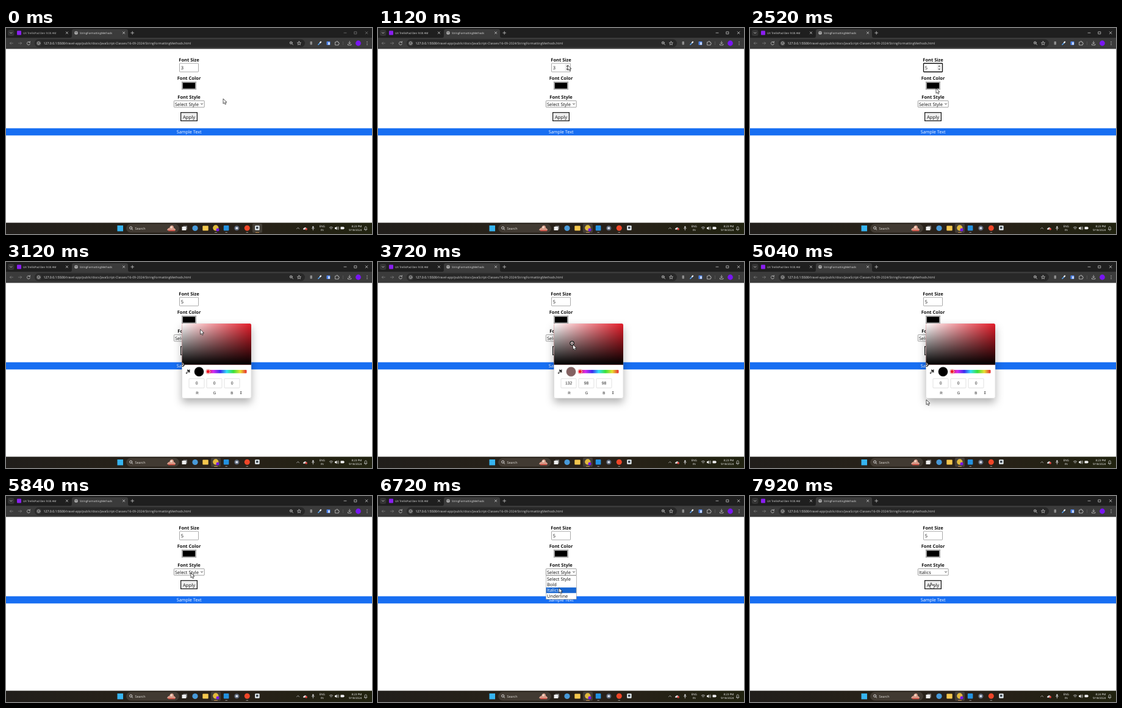
Write an HTML page that moves like this. It is 600 px wide and 338 px high and loops after 8000 ms.

```html
<!DOCTYPE html>
<html lang="en">
<head>
<meta charset="utf-8">
<title>Font form</title>
<style>
html, body { margin: 0; width: 100%; height: 100%; overflow: hidden; background: #fff; }
svg { display: block; width: 100%; height: 100%; }
text { font-family: "Open Sans", "Noto Sans", sans-serif; text-rendering: geometricPrecision; white-space: pre; }
.form { font-size: 7.45px; fill: #111; }
.bold { font-weight: 700; font-size: 7.5px; }
.mid { text-anchor: middle; }
.tab { font-size: 4.45px; fill: #e3e3e3; }
.tray { font-size: 4.5px; fill: #fff; }
.line { fill: none; stroke: #c8c8c8; stroke-width: .8; stroke-linecap: round; stroke-linejoin: round; }
.rgb text { font: 6.8px "Liberation Sans", Arial, sans-serif; fill: #222; text-anchor: middle; }
.rgb .unit { font-size: 6.2px; }
</style>
</head>
<body>
<svg viewBox="0 0 600 338" preserveAspectRatio="none">
  <defs>
    <linearGradient id="bar">
      <stop offset="0" stop-color="#211e1b"/><stop offset=".3" stop-color="#262119"/>
      <stop offset=".6" stop-color="#29211a"/><stop offset="1" stop-color="#20220f"/>
    </linearGradient>
    <linearGradient id="white"><stop stop-color="#fff"/><stop offset="1" stop-color="#fff" stop-opacity="0"/></linearGradient>
    <linearGradient id="black" x2="0" y2="1"><stop stop-color="#000" stop-opacity="0"/><stop offset="1"/></linearGradient>
    <linearGradient id="hue">
      <stop stop-color="#f02030"/><stop offset=".17" stop-color="#d02af0"/><stop offset=".34" stop-color="#3a2cf0"/>
      <stop offset=".5" stop-color="#30dff5"/><stop offset=".67" stop-color="#38e038"/>
      <stop offset=".84" stop-color="#e8e030"/><stop offset="1" stop-color="#e82830"/>
    </linearGradient>
    <filter id="shade" x="-30%" y="-30%" width="160%" height="170%">
      <feDropShadow dx="0" dy="7" stdDeviation="7" flood-opacity=".3"/>
    </filter>
    <clipPath id="panel"><rect x="288.5" y="101" width="113.5" height="122.5" rx="2.5"/></clipPath>
  </defs>
  <rect width="600" height="338" fill="#fff"/>

  <!-- browser frame -->
  <rect width="600" height="17" fill="#1f1f1f"/>
  <rect y="16" width="600" height="18.3" fill="#3b3b3b"/>
  <path d="M105 16q3 0 3-3V5q0-3 3-3h86q3 0 3 3v8q0 3 3 3z" fill="#3b3b3b"/>
  <rect x="3" y="3" width="10.5" height="10" rx="3" fill="#343434"/>
  <path class="line" d="M6.5 7.2l1.8 1.8 1.8-1.8"/>
  <rect x="18" y="4.5" width="7" height="7" rx="1" fill="#8a1ff0"/>
  <text class="tab" id="tab" x="28" y="9.7">UX TrellisPad Den 9:00 AM</text>
  <circle cx="115" cy="8" r="2.8" fill="#bbb"/><path d="M112.5 7.5h5M115 5.2v5.6" stroke="#555" stroke-width=".6"/>
  <text class="tab" x="121" y="9.7">StringFormattingMethods</text>
  <path class="line" d="M98.2 6.2l3.4 3.4m0-3.4l-3.4 3.4M191.4 6.2l3.4 3.4m0-3.4l-3.4 3.4M207.2 5.6v4.8M204.8 8h4.8"/>
  <path class="line" id="controls" d="M554 8h4M571.2 6.2h3.6v3.6h-3.6zM589.2 6l3.8 3.8m0-3.8l-3.8 3.8"/>
  <path class="line" stroke-opacity=".45" d="M11.5 25h-5m2-2l-2 2 2 2M20.5 25h5m-2-2l2 2-2 2"/>
  <path class="line" d="M39 23.5a2.6 2.6 0 1 0 .5 2.4M39.4 22v1.8h-1.8"/>
  <rect x="47" y="18.5" width="443" height="13" rx="6.5" fill="#282828"/>
  <circle cx="53.5" cy="25" r="4.5" fill="#3d3d3d"/><circle class="line" cx="53.5" cy="25" r="2.3"/><path class="line" d="M53.5 25v1"/>
  <text x="61.5" y="26.9" font-size="5.2" fill="#d5d5d5"><tspan fill="#fff">127.0.0.1:5500</tspan>/travel-app/public/docs/JavaScript-Classes/16-09-2024/StringFormattingMethods.html</text>
  <circle class="line" cx="467.3" cy="24.3" r="2"/><path class="line" d="M469 26l1.6 1.6M466.5 24.3h1.6"/>
  <path class="line" d="M480.5 22l.9 2 2.1.2-1.6 1.4.5 2.1-1.9-1.1-1.9 1.1.5-2.1-1.6-1.4 2.1-.2z"/>
  <rect x="498.5" y="22" width="3.5" height="5.5" rx="1" fill="#8e8e8e"/>
  <path d="M511.5 27.8l3.8-3.8" stroke="#58a6f5" stroke-width="1.6"/><path d="M514.5 24.5l2.2-2.2" stroke="#fff" stroke-width="2"/>
  <rect x="525.5" y="22" width="6" height="6" rx="1" fill="#4f83e8"/><rect x="528.5" y="23.5" width="2" height="4" fill="#fff"/>
  <path class="line" d="M540 23h1.7q0-1.5 1-1.5t1 1.5h1.5v1.6q1.3 0 1.3.9t-1.3.9v1.6H540z"/>
  <path d="M552.5 22v6" stroke="#666" stroke-width=".6"/>
  <path class="line" d="M563.2 21.8v4m-1.7-1.6l1.7 1.7 1.7-1.7M560.5 26.5v1.5h5.4v-1.5"/>
  <circle cx="577.5" cy="25" r="4.4" fill="#7816f2"/>
  <path d="M592 22.6v.1M592 25v.1M592 27.4v.1" stroke="#ddd" stroke-width="1.1" stroke-linecap="round"/>

  <!-- form -->
  <g class="form">
    <text class="bold mid" x="300" y="55">Font Size</text>
    <rect id="field" x="284.5" y="58" width="31" height="14" rx=".8" fill="#fff"/>
    <text id="size" x="286.7" y="68.2"></text>
    <g id="spin"><rect x="306.5" y="59.5" width="7.5" height="11" fill="#eee"/>
      <path d="M308.4 63.4h3.6l-1.8-2.2zM308.4 66.8h3.6l-1.8 2.2z" fill="#555"/></g>
    <text class="bold mid" x="300" y="85.2">Font Color</text>
    <rect x="288.3" y="88.3" width="23.4" height="12.4" fill="#efefef" stroke="#808080" stroke-width=".7"/>
    <rect id="swatch" x="289.8" y="89.7" width="20.4" height="9.8" stroke="#777" stroke-width=".4"/>
    <text class="bold mid" x="300" y="116">Font Style</text>
    <rect x="275.4" y="119.3" width="49.8" height="10.8" rx="1" fill="#fff" stroke="#767676" stroke-width=".7"/>
    <text id="style" x="277" y="127.6"></text>
    <path d="M319.3 123.6l1.7 1.8 1.7-1.8" fill="none" stroke="#222" stroke-width=".9"/>
    <rect x="286.6" y="138.7" width="26.8" height="13.6" fill="#efefef" stroke="#111" stroke-width="1.2"/>
    <text class="mid" x="300" y="148.6" font-size="7.65">Apply</text>
  </g>
  <rect y="164.5" width="600" height="11.8" fill="#176ef2"/>
  <text class="mid" x="300.2" y="173.2" font-size="7.25" fill="#fff">Sample Text</text>

  <g id="menu" class="form"></g>

  <!-- colour picker -->
  <g id="picker">
    <rect x="288.5" y="101" width="113.5" height="122.5" rx="2.5" fill="#fff" stroke="#bbb" stroke-width=".4" filter="url(#shade)"/>
    <g clip-path="url(#panel)">
      <rect x="288" y="101" width="114" height="67.5" fill="#e21c29"/>
      <rect x="288" y="101" width="114" height="67.5" fill="url(#white)"/>
      <rect x="288" y="101" width="114" height="67.5" fill="url(#black)"/>
      <g id="ring" fill="none"><circle r="3" stroke="#111" stroke-width="1.6"/><circle r="2.1" stroke="#fff" stroke-width=".9"/></g>
    </g>
    <path d="M295.3 183l.5-1.7 3-3 1.2 1.2-3 3z" fill="none" stroke="#111" stroke-width=".9"/>
    <path d="M297.8 177.4l3 3M299.3 179l1.6-1.6" stroke="#111" stroke-width="1.7" stroke-linecap="round"/>
    <circle id="dot" cx="316.5" cy="180" r="7.8" stroke="#999" stroke-width=".3"/>
    <rect x="329" y="177" width="65.5" height="5.6" rx="1" fill="url(#hue)"/>
    <circle cx="331.3" cy="179.8" r="3.2" fill="#ee1c2a" stroke="#fff" stroke-width="1"/>
    <circle cx="331.3" cy="179.8" r="3.8" fill="none" stroke="#c33" stroke-width=".4"/>
    <g class="rgb" id="rgb"></g>
    <path d="M383.6 213.7l1.5-1.7 1.5 1.7zM383.6 215.3l1.5 1.7 1.5-1.7z" fill="#222"/>
  </g>

  <!-- taskbar -->
  <rect y="319.5" width="600" height="18.5" fill="url(#bar)"/>
  <rect id="active" y="321" width="16" height="15" rx="2" fill="#fff" fill-opacity=".13"/>
  <rect x="182.5" y="324" width="9.5" height="9.5" fill="#36b4f0"/>
  <rect x="197.5" y="322" width="86" height="13.2" rx="6.6" fill="#413a32" stroke="#574f45" stroke-width=".4"/>
  <circle cx="204.7" cy="328" r="2" fill="none" stroke="#fff" stroke-width=".8"/><path d="M206.2 329.6l1.8 1.8" stroke="#fff" stroke-width=".8"/>
  <text x="211.5" y="330.7" font-size="5.4" fill="#e2ded8">Search</text>
  <path d="M264 332q1-4 4-4 1-4 4-4t3 4q3 1 3 4z" fill="#d89a88"/><path d="M266 332.5h11" stroke="#d84a3f" stroke-width="1.5"/>
  <circle cx="271" cy="327" r="1.7" fill="#f0dcca"/>
  <rect x="290.5" y="324.5" width="6.5" height="6" fill="#777"/><rect x="288.5" y="326" width="6.8" height="6" fill="#eee"/>
  <circle cx="310" cy="328.5" r="4.6" fill="#4899d8"/>
  <rect x="322.3" y="324.5" width="9.4" height="8" rx="1" fill="#f5c74e"/>
  <circle cx="343.8" cy="328" r="4.7" fill="#e0b83d"/><circle cx="347" cy="331" r="2.5" fill="#7816f2"/>
  <rect x="356.8" y="324" width="8.6" height="8.6" rx="1" fill="#2391e0"/>
  <circle cx="378.3" cy="328.4" r="4.2" fill="#566072"/><rect x="376.4" y="326.6" width="3.8" height="3.6" fill="#d8dde8"/>
  <circle cx="395.3" cy="328.3" r="4.5" fill="#ef4628"/>
  <rect x="408.2" y="324.3" width="7.4" height="7.4" rx="1" fill="#e8f0f5"/><rect x="410" y="326" width="3.5" height="3.5" fill="#39434d"/>
  <path d="M342 335.4h4M359.5 335.4h3.4M393.6 335.4h3.4" stroke="#aaa" stroke-width=".8"/>
  <path id="under" stroke="#c58c4d" stroke-width="1"/>
  <path class="line" d="M476.7 329.5l2-2 2 2"/>
  <path d="M487.2 330.8q-.5-2.7 1.8-2.8 1-2 2.7-.2 2 0 1.6 3z" fill="#ddd"/><circle cx="492.2" cy="330" r="1.7" fill="#e23b36"/>
  <rect x="502.3" y="325" width="2.2" height="4.2" rx="1.1" fill="#ccc"/><path class="line" d="M501.4 328.5q2 3.4 4 0M503.4 330.3v1.5"/>
  <g class="tray">
    <text class="mid" x="518.3" y="327.3">ENG</text><text class="mid" x="518.3" y="333.3">IN</text>
    <text id="clock" x="583.3" y="327.2" text-anchor="end"></text><text x="583.3" y="333.3" text-anchor="end">9/18/2024</text>
  </g>
  <path class="line" d="M530.2 327.3q2.8-2.4 5.6 0M531.4 328.8q1.6-1.3 3.2 0M533 330.3v.1" stroke="#fff"/>
  <path d="M539 327.3h1.5l1.8-1.6v5.6l-1.8-1.6H539z" fill="#fff"/><path class="line" d="M543.5 327q1 1.5 0 3M544.8 326q1.8 2.5 0 5"/>
  <rect x="548.5" y="326.3" width="5.5" height="4" rx=".8" fill="#eee"/><path d="M554.5 327.4v1.8" stroke="#eee" stroke-width=".8"/>
  <path class="line" d="M587.4 330.6h4.6l-.7-1v-2q-.2-1.8-1.6-1.8t-1.6 1.8v2zM589 332h1.4"/>

  <path id="arrow" d="M0 0v8.2l1.9-1.7 1.3 2.9 1.5-.7-1.3-2.8h2.6z" fill="#fff" stroke="#111" stroke-width=".7" stroke-linejoin="round"/>
  <path id="hand" d="M-1 0q1-1 1.8 0v3l3 .7q1.3.3 1.2 1.6l-.7 3.6h-4.5l-3-3.3q-.3-1.2 1-1l1.2.8z" fill="#fff" stroke="#111" stroke-width=".7" stroke-linejoin="round"/>
</svg>
<script>
const $ = id => document.getElementById(id);
const set = (id, attrs) => { for (const k in attrs) $(id).setAttribute(k, attrs[k]); };
const show = (id, on) => $(id).style.display = on ? "" : "none";
const write = (id, s) => { if ($(id).textContent !== s) $(id).textContent = s; };

const LOOP = 8000;
const OPTIONS = ["Select Style", "Bold", "Italics", "Underline"];
const MENU_TOP = 131.3, ROW = 9.4;

// [ms, x, y]
const POINTER = [
  [0, 356, 116], [300, 356, 116], [1000, 311, 61], [2050, 311, 61],
  [2520, 305, 99], [2700, 303, 96], [2900, 303, 96], [3350, 335, 126],
  [3720, 319.5, 135.5], [3850, 319.5, 135.5], [4240, 287.5, 132],
  [5040, 289, 226], [5150, 289, 226], [5400, 264, 212], [5840, 303, 126],
  [6350, 303, 126], [6800, 296, 153], [7150, 296, 153], [7600, 297, 143], [8000, 297, 143]
];
const PICK = [
  [3350, 289, 168], [3351, 334, 124], [3720, 318.1, 133.3], [3850, 318.1, 133.3],
  [4240, 289, 125.2], [4640, 289, 168]
];

function along(track, t) {
  let i = track.findIndex(k => k[0] > t);
  if (i < 0) i = track.length;
  if (i === 0) return track[0].slice(1);
  const a = track[i - 1], b = track[i] || a;
  const u = b === a ? 0 : (t - a[0]) / (b[0] - a[0]);
  const e = u * u * (3 - 2 * u);
  return [a[1] + (b[1] - a[1]) * e, a[2] + (b[2] - a[2]) * e];
}

$("rgb").innerHTML = ["R", "G", "B"].map((unit, i) => {
  const x = 300 + i * 29;
  return `<rect x="${x}" y="191.3" width="25" height="15.4" rx="1" fill="#fff" stroke="#d5d5d5" stroke-width=".7"/>
    <text id="val${i}" x="${x + 12.6}" y="201.4"></text>
    <text class="unit" x="${x + 13.4 - i * .6}" y="217">${unit}</text>`;
}).join("");

$("menu").innerHTML =
  `<rect x="275.4" y="${MENU_TOP - .6}" width="49.8" height="${OPTIONS.length * ROW + 1.2}" fill="#fff" stroke="#767676" stroke-width=".6"/>` +
  OPTIONS.map((name, i) =>
    `<rect id="row${i}" x="275.7" y="${MENU_TOP + i * ROW}" width="49.2" height="${ROW}"/>
     <text id="opt${i}" x="277" y="${MENU_TOP + i * ROW + 7.3}">${name}</text>`).join("");

function render(t) {
  const [x, y] = along(POINTER, t);
  const awake = t >= 1000;
  const focused = t >= 1200 && t < 2760;

  write("size", t < 1240 ? "3" : t < 1640 ? "4" : "5");
  set("field", focused ? { stroke: "#111", "stroke-width": 1.3 } : { stroke: "#858585", "stroke-width": .7 });
  show("spin", focused || (t > 900 && t < 1200));

  const [px, py] = along(PICK, t);
  const sat = (px - 289) / 113, val = Math.max(0, 255 * (168 - py) / 67);
  const red = Math.round(val), rest = Math.round(val * (1 - sat));
  const color = `rgb(${red},${rest},${rest})`;
  show("picker", t >= 2800 && t < 5420);
  set("ring", { transform: `translate(${px} ${py})` });
  set("dot", { fill: color });
  set("swatch", { fill: t < 3800 ? "#000" : color });
  [red, rest, rest].forEach((v, i) => write("val" + i, String(v)));

  show("menu", t >= 6000 && t < 7100);
  const over = Math.max(0, Math.floor((y - MENU_TOP) / ROW));
  OPTIONS.forEach((_, i) => {
    set("row" + i, { fill: i === over ? "#1967d2" : "#fff" });
    set("opt" + i, { fill: i === over ? "#fff" : "#111" });
  });
  write("style", OPTIONS[t < 7100 ? 0 : 2]);

  write("clock", t < 6800 ? "8:23 PM" : "8:24 PM");
  set("controls", { opacity: awake ? 1 : .5 });
  set("tab", { opacity: awake ? 1 : .85 });
  set("active", { x: awake ? 336 : 404 });
  set("under", { d: awake ? "M341 335.4h6" : "M409 335.4h6" });

  const hand = t >= 7150;
  show("hand", hand);
  show("arrow", !hand);
  set(hand ? "hand" : "arrow", { transform: `translate(${x} ${y})` });
}

function tick(now) {
  render(now % LOOP);
  requestAnimationFrame(tick);
}
render(0);
requestAnimationFrame(tick);
</script>
</body>
</html>
```
